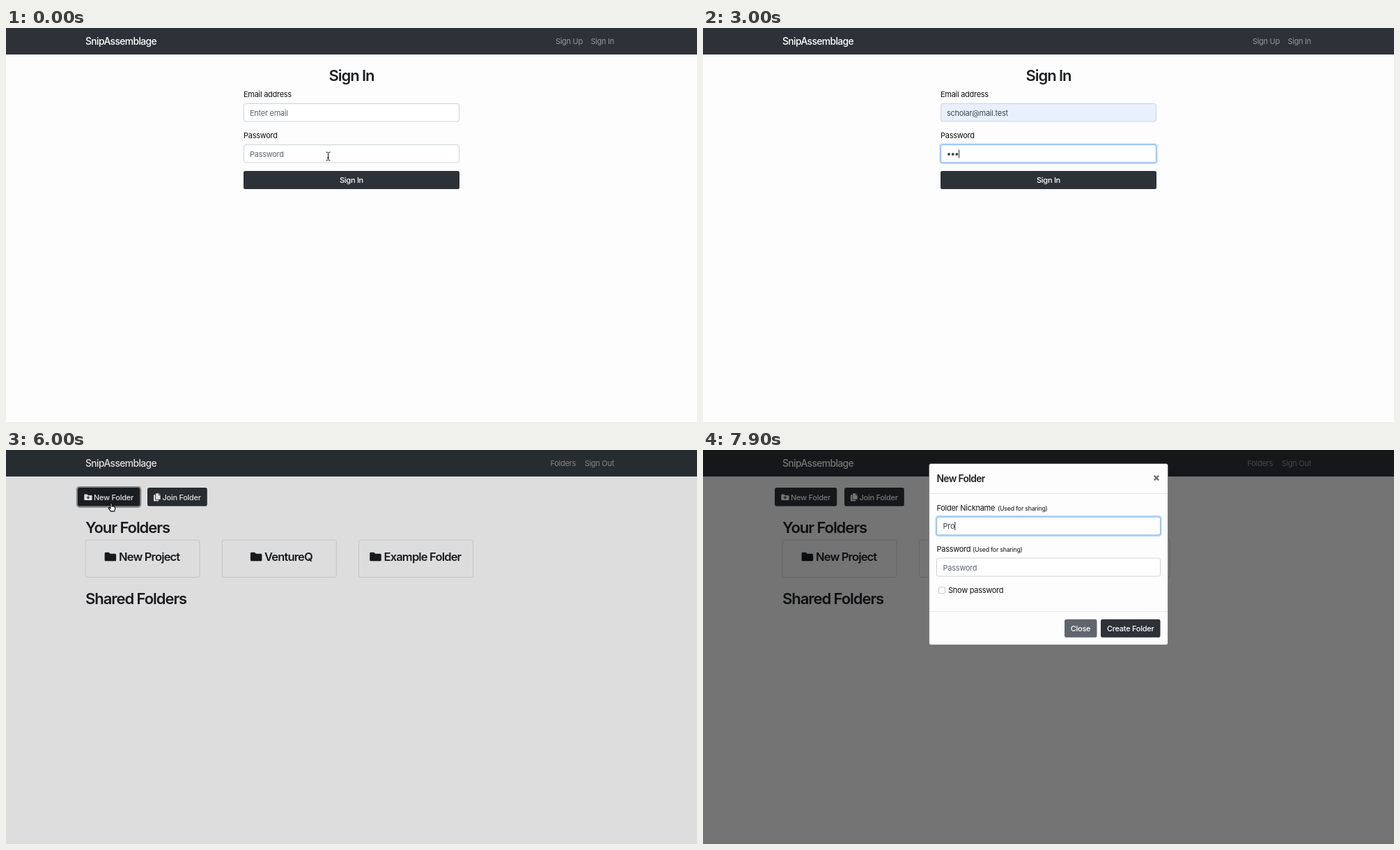
An HTML page that plays this animation: 992x565 px, repeating every 8000 ms.

```html
<!DOCTYPE html>
<html lang="en">
<head>
<meta charset="utf-8">
<title>Sign in and create a folder</title>
<style>
html, body { margin: 0; width: 100%; height: 100%; overflow: hidden; background: #fefdfe; }
svg { display: block; width: 992px; height: 565px; }
text { font: 11px Inter, "Open Sans", sans-serif; letter-spacing: -.025em; fill: #111; white-space: pre; }
.brand { font-size: 13.8px; font-weight: 450; letter-spacing: -.042em; fill: #fff; }
.nav { fill: #96999b; }
.h2 { font-size: 22px; font-weight: 560; letter-spacing: -.048em; fill: #1d1f22; }
.h4 { font-size: 16.5px; font-weight: 560; letter-spacing: -.05em; fill: #1d1f22; }
.h5 { font-size: 13.8px; font-weight: 560; letter-spacing: -.045em; fill: #1d1f22; }
.small { font-size: 8.8px; }
.hint { fill: #5f666d; }
.value { fill: #41474d; }
.white { font-weight: 450; fill: #fff; }
.mid { text-anchor: middle; }
.end { text-anchor: end; }
.item { font-size: 9.1px; font-weight: 500; letter-spacing: 0; fill: #f4f4f5; }
.dark { fill: #2d3238; }
.hover { fill: #1f2226; }
.grey { fill: #5f666e; }
.field { fill: #fff; stroke: #cdd2d9; }
.auto { fill: #e8f0fe; }
.card { fill: none; stroke: #dfdee0; }
.icon { fill: #1b1d20; }
.arrow, .hand { stroke-width: .8; stroke-linejoin: round; }
.arrow { fill: #000; stroke: #fff; }
.hand { fill: #fff; stroke: #000; stroke-width: 1.1; }
</style>
</head>
<body>
<svg viewBox="0 0 992 565">
  <defs>
    <path id="folder" d="M1.5 0H6L8 2H15a1.5 1.5 0 0 1 1.5 1.5V11A1.5 1.5 0 0 1 15 12.5H1.5A1.5 1.5 0 0 1 0 11V1.5A1.5 1.5 0 0 1 1.5 0Z"/>
  </defs>
  <rect class="dark" width="992" height="38"/>
  <text class="brand" x="114" y="23.5">SnipAssemblage</text>

  <g id="login">
    <text class="nav end" x="828" y="23">Sign Up</text>
    <text class="nav end" x="873" y="23">Sign In</text>
    <text class="h2 mid" x="496" y="76">Sign In</text>
    <text x="341" y="98.5">Email address</text>
    <rect class="field" id="email" x="341.5" y="108.5" width="309" height="25.5" rx="2.5"/>
    <text class="hint" id="emailHint" x="350" y="125.5">Enter email</text>
    <text class="value" id="emailText" x="350" y="125.5"></text>
    <text x="341" y="158">Password</text>
    <rect class="field" x="341.5" y="167.5" width="309" height="25.5" rx="2.5"/>
    <text class="hint" id="passHint" x="350" y="185">Password</text>
    <g id="dots" class="value"></g>
    <rect class="dark" id="submit" x="341" y="205" width="310" height="26" rx="2.8"/>
    <text class="white mid" x="496" y="222">Sign In</text>
  </g>

  <g id="member">
    <text class="nav end" x="818" y="23">Folders</text>
    <text class="nav end" x="873" y="23">Sign Out</text>
  </g>
  <g id="loader"></g>

  <g id="folders">
    <rect id="buttonRing" x="102" y="53" width="91.2" height="28.6" rx="3.6" fill="none" stroke="#96989b" stroke-width="2.2"/>
    <rect class="dark" id="newButton" x="103" y="54" width="89.2" height="26.6" rx="2.8"/>
    <use href="#folder" fill="#fff" transform="translate(112.3 63.6) scale(.68)"/>
    <path d="M118 66v4.4M115.8 68.2h4.4" stroke="#2d3238" stroke-width="1.2"/>
    <text class="white" x="126" y="71.8">New Folder</text>
    <rect class="dark" x="203" y="54" width="85.8" height="26.6" rx="2.8"/>
    <path class="white" d="M215 62.3h4v2.6h2.6v5.8h-6.6ZM219.6 62.3l2 2h-2ZM212 64.2h2.2v7.3h5v1.8h-7.2Z"/>
    <text class="white" x="224.5" y="71.8">Join Folder</text>
    <text class="h2" x="114" y="118.5">Your Folders</text>
    <rect class="card" x="114" y="129" width="164" height="53.5" rx="2.8"/>
    <rect class="card" x="310.3" y="129" width="164" height="53.5" rx="2.8"/>
    <rect class="card" x="506.5" y="129" width="164" height="53.5" rx="2.8"/>
    <use class="icon" href="#folder" x="141.6" y="146.8"/>
    <use class="icon" href="#folder" x="350.9" y="146.8"/>
    <use class="icon" href="#folder" x="522.2" y="146.8"/>
    <text class="h4" x="162" y="159.3">New Project</text>
    <text class="h4" x="371" y="159.3">VentureQ</text>
    <text class="h4" x="542.5" y="159.3">Example Folder</text>
    <text class="h2" x="114" y="220.5">Shared Folders</text>
  </g>

  <rect id="shade" width="992" height="565"/>
  <g id="modal">
    <rect x="324.5" y="19.5" width="343" height="260" rx="3" fill="#fefdfe" stroke="#000" stroke-opacity=".3"/>
    <path d="M325 62.5h342M325 231.5h342" stroke="#e4e6e9"/>
    <text class="h5" x="335.5" y="45.6">New Folder</text>
    <path d="M647.6 36.8l6.6 6.6m0-6.6l-6.6 6.6" stroke="#6c6c6d" stroke-width="2.2"/>
    <text x="335.5" y="86.5">Folder Nickname</text>
    <text class="small" x="423" y="86.5">(Used for sharing)</text>
    <rect class="field" x="335.5" y="96" width="321" height="26" rx="2.5"/>
    <text class="hint" id="nameHint" x="344.5" y="113">ex: MKLB2031TORV</text>
    <text class="value" id="nameText" x="344.5" y="113"></text>
    <text x="335.5" y="145.8">Password</text>
    <text class="small" x="387" y="145.8">(Used for sharing)</text>
    <rect class="field" x="335.5" y="155" width="321" height="26" rx="2.5"/>
    <text class="hint" x="344.5" y="172.5">Password</text>
    <rect x="338.5" y="196.7" width="9" height="9" rx="1.8" fill="#fff" stroke="#c4c4c6"/>
    <text x="352" y="205">Show password</text>
    <rect class="grey" x="519" y="242.7" width="46.5" height="26" rx="2.8"/>
    <text class="white mid" x="542" y="260">Close</text>
    <rect class="dark" x="571" y="242.7" width="85.5" height="26" rx="2.8"/>
    <text class="white mid" x="613.7" y="260">Create Folder</text>
  </g>

  <g id="ring" fill="none">
    <rect rx="3.6" stroke-width="2.2"/>
    <rect rx="2.5"/>
  </g>
  <rect id="caret" width="1" height="12" fill="#333"/>

  <g id="menu">
    <rect x="340.5" y="136" width="311" height="37" rx="3" opacity=".16"/>
    <rect x="341" y="135.5" width="310" height="35.5" rx="2" fill="#222427"/>
    <text class="item" x="349.5" y="156.6">scholar@mail.test</text>
  </g>

  <path id="beam" d="M-3-6Q0-6 0-4.5Q0-6 3-6M0-4.5V4.5M-3 6Q0 6 0 4.5Q0 6 3 6M-1.5 2h3" fill="none" stroke="#111"/>
  <path id="arrow" class="arrow" d="M0 0V9.6L2.2 7.6L3.8 11.3L5.4 10.6L3.8 7H6.8Z"/>
  <path id="hand" class="hand" d="M-1 1Q0-.6 1 1V5Q2 4.2 2.8 5.2Q3.8 4.6 4.4 5.7Q5.6 5.4 5.6 6.8V9L4.6 12H-.6L-3.6 8Q-3.6 6.4-2.2 7L-1 8Z"/>
</svg>
<script>
const LOOP = 8000, STEP = 100;
const $ = id => document.getElementById(id);
const show = (id, on) => $(id).style.display = on ? '' : 'none';
const clamp = v => Math.max(0, Math.min(1, v));
const attrs = (el, o) => { for (const k in o) el.setAttribute(k, o[k]); };

function circles(id, n, r) {
  return Array.from({ length: n }, () => {
    const c = document.createElementNS('http://www.w3.org/2000/svg', 'circle');
    c.setAttribute('r', r);
    return $(id).appendChild(c);
  });
}
const dots = circles('dots', 6, 2);
const balls = circles('loader', 8, 7);
dots.forEach((c, i) => attrs(c, { cx: 353 + i * 5.7, cy: 181 }));
balls.forEach((c, i) => attrs(c, {
  cx: 442 + i * 15.15, fill: ['#ca505d', '#c87557', '#c9aa5e', '#a0b476'][i % 4]
}));

// pointer path: time, x, y, shape
const path = [
  [0, 462.5, 184, 'beam'], [300, 445, 164, 'arrow'], [600, 420.5, 130.5, 'beam'], [900, 420.5, 130.5, ''],
  [1600, 420.5, 130.5, 'beam'], [1700, 416, 138, 'arrow'], [1900, 406, 153, 'arrow'], [2100, 406, 155, 'arrow'],
  [2300, 408, 174, 'beam'], [2400, 408.5, 179.5, 'beam'], [2700, 408.5, 179.5, ''],
  [3500, 408.5, 179.5, ''], [3600, 411, 184, 'beam'], [3700, 418, 196, 'arrow'], [3800, 430, 209, 'hand'],
  [4000, 441, 220, 'hand'], [4400, 441, 220, 'arrow'], [4900, 441, 220, 'arrow'],
  [5300, 210, 100, 'arrow'], [5500, 122, 60, 'hand'], [5800, 151, 76.5, 'hand'],
  [6100, 151, 75.5, 'arrow'], [6500, 376.3, 131, 'arrow'], [6700, 440, 110.5, 'beam'],
  [7500, 440, 110.5, ''], [LOOP, 440, 110.5, '']
];

function movePointer(t) {
  const i = path.findIndex(p => p[0] > t) - 1;
  const [t0, x0, y0, shape] = path[i], [t1, x1, y1] = path[i + 1];
  const k = (t - t0) / (t1 - t0);
  for (const id of ['beam', 'arrow', 'hand']) show(id, id === shape);
  if (shape) attrs($(shape), { transform: `translate(${x0 + (x1 - x0) * k} ${y0 + (y1 - y0) * k})` });
}

function ring(t) {
  const blue = ['#bfddfb', '#80b6f7'];
  const f = t >= 6800 ? [335.5, 96, 321, 26, ...blue]
    : t >= 4000 && t < 4400 ? [341, 205, 310, 26, '#96989b', 'none']
    : t >= 2500 && t < 4000 ? [341.5, 167.5, 309, 25.5, ...blue]
    : t >= 600 && t < 2500 ? [341.5, 108.5, 309, 25.5, ...blue] : null;
  show('ring', f);
  if (!f) return;
  const [x, y, width, height, glow, line] = f, [outer, inner] = $('ring').children;
  attrs(outer, { x: x - 1.2, y: y - 1.2, width: width + 2.4, height: height + 2.4, stroke: glow });
  attrs(inner, { x, y, width, height, stroke: line });
}

// the last entry whose time has come
const typed = (t, list) => list.reduce((s, [at, v]) => t >= at ? v : s, '');

function type(t) {
  const email = typed(t, [[900, 's'], [1100, 'sch'], [1200, 'schol'], [2000, 'scholar@mail.test']]);
  const name = typed(t, [[7500, 'P'], [7700, 'Pr'], [7900, 'Pro']]);
  const count = t < 2700 ? 0 : t < 2900 ? 1 : Math.min(6, 2 + Math.floor((t - 2900) / 100));
  $('emailText').textContent = email;
  $('nameText').textContent = name;
  show('emailHint', !email);
  show('nameHint', !name);
  show('passHint', !count);
  dots.forEach((c, i) => c.style.display = i < count ? '' : 'none');
  $('email').classList.toggle('auto', t >= 2000);

  const width = id => $(id).getComputedTextLength();
  const at = t >= 6800 ? [344.5 + width('nameText'), 103]
    : t >= 2500 && t < 4000 ? [350 + count * 5.7, 174.5]
    : t >= 600 && t < 2500 ? [350 + width('emailText'), 115.5] : null;
  show('caret', at);
  if (at) attrs($('caret'), { x: at[0], y: at[1] });
}

function load(t) {
  balls.forEach((c, i) => {
    const p = (i / 4 + (t - 4400) / 800) % 2, u = Math.abs(p > 1 ? 2 - p : p);
    c.setAttribute('cy', 79.3 + 55 * u ** 3 * (u * (6 * u - 15) + 10));
  });
}

function draw(t) {
  const loading = t >= 4400 && t < 4600;
  show('login', t < 4400);
  show('member', t >= 4400);
  show('loader', loading);
  show('folders', t >= 4600);
  show('menu', t >= 900 && t < 2000);
  show('modal', t > 6100);
  type(t);
  if (loading) load(t);
  ring(t);
  movePointer(t);
  $('submit').setAttribute('class', t >= 3800 ? 'hover' : 'dark');
  $('newButton').setAttribute('class', t >= 5500 && t < 6100 ? 'hover' : 'dark');
  show('buttonRing', t >= 6000 && t < 6700);
  $('shade').style.opacity = .54 * clamp((t - 5950) / 215);
  const k = clamp((t - 6100) / 300), ease = 1 - (1 - k) ** 2;
  $('modal').style.opacity = clamp((t - 6100) / 150);
  attrs($('modal'), { transform: `translate(0 ${-34 * (1 - ease)})` });
}

function frame() {
  draw(Math.floor(performance.now() % LOOP / STEP) * STEP);
  requestAnimationFrame(frame);
}
frame();
</script>
</body>
</html>
```
